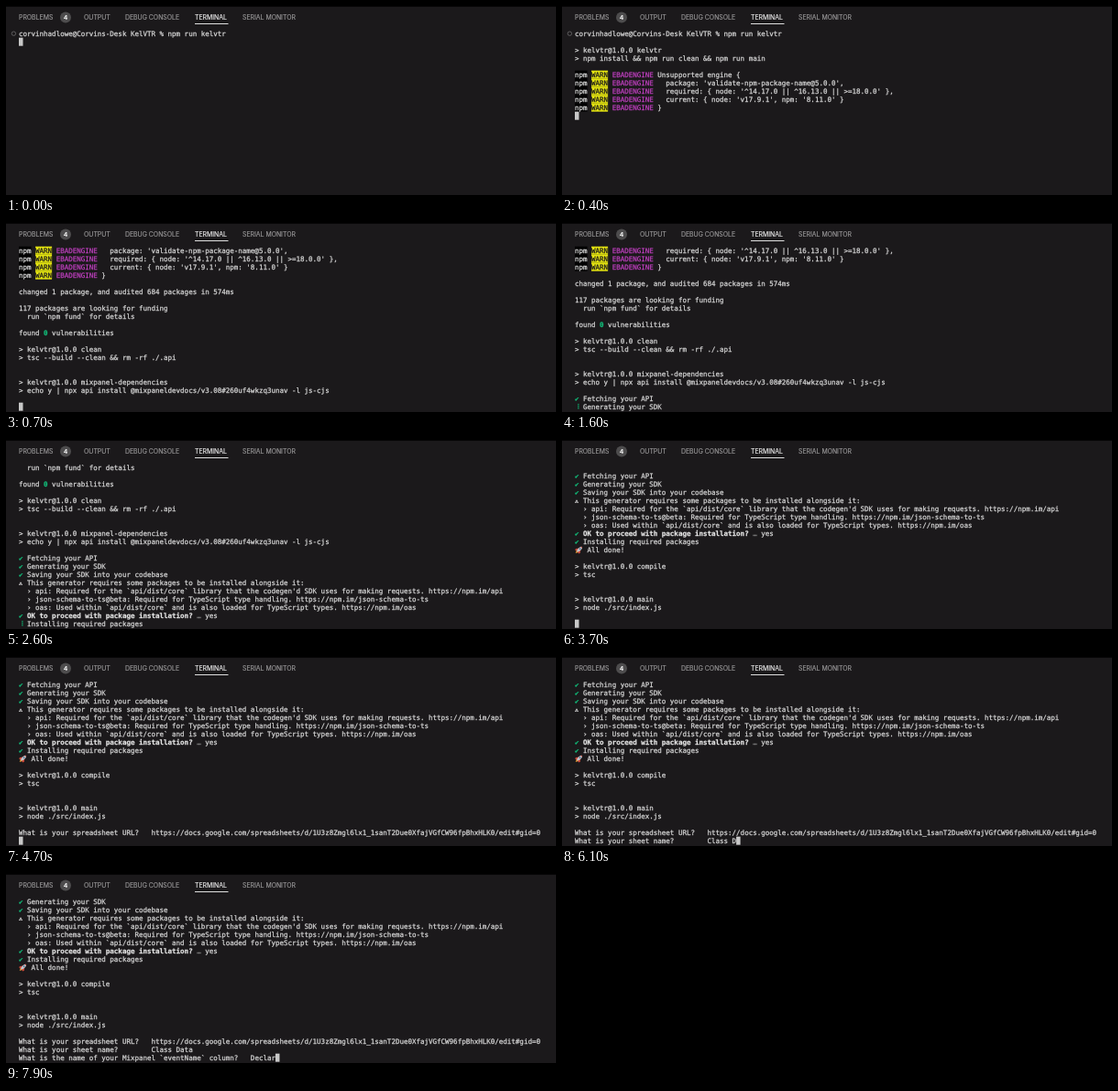
These frames come from a looping animation (600 by 207 pixels, 8000 ms). An HTML page with a canvas:

```html
<!DOCTYPE html>
<html lang="en">
<head>
<meta charset="utf-8">
<title>Terminal session</title>
<style>
  html, body { margin: 0; width: 100%; height: 100%; overflow: hidden; background: #1b191b; }
  canvas { display: block; width: 600px; height: 207px; }
</style>
</head>
<body>
<canvas id="stage"></canvas>
<script>
const W = 600, H = 207, LOOP = 8000;
const ROWS = 20, ROW_H = 9, TOP = 25.7, LEFT = 14, CELL = 4.515;
const MONO = '"DejaVu Sans Mono", monospace';
const SANS = 'Inter, sans-serif';
const BG = '#1b191b', TEXT = '#d6d6d6';

const canvas = document.getElementById('stage');
const ctx = canvas.getContext('2d');
const dpr = window.devicePixelRatio || 1;
canvas.width = W * dpr;
canvas.height = H * dpr;
ctx.scale(dpr, dpr);
ctx.lineJoin = 'round';

// Inline markup: «style|text»
const STYLES = {
  n: { color: '#e5e5e5', back: '#000' },
  w: { color: '#1b191b', back: '#e5e510' },
  m: { color: '#bc3fbc' },
  g: { color: '#12bc79' },
  G: { color: '#12bc79', bold: true },
  b: { color: '#e2e2e2', bold: true },
  d: { color: '#8a8a8a' },
  a: { color: '#e8e8e8', size: 6.6 },
  s: { color: '#12a86c', spinner: true },
  r: { rocket: true }
};
const SPINNER = '⠋⠙⠹⠸⠼⠴⠦⠧⠇⠏';
const STALLS = [[1600, 1900], [2100, 2500]];

const warn = text => `«n|npm» «w|WARN» «m|EBADENGINE» ${text}\n`;
const script = (name, command) => `\n> kelvtr@1.0.0 ${name}\n> ${command}\n\n`;
const busy = text => `\r«s|*» ${text}`;
const done = text => `\r«g|✔» ${text}\n`;

// Terminal output by time; "\r" rewrites the current line.
const output = [
  [0, 'corvinhadlowe@Corvins-Desk KelVTR % npm run kelvtr\n'],
  [100, script('kelvtr', 'npm install && npm run clean && npm run main')],
  [400, warn('Unsupported engine {') +
    warn("  package: 'validate-npm-package-name@5.0.0',") +
    warn("  required: { node: '^14.17.0 || ^16.13.0 || >=18.0.0' },") +
    warn("  current: { node: 'v17.9.1', npm: '8.11.0' }") +
    warn('}')],
  [500, '\nchanged 1 package, and audited 684 packages in 574ms\n' +
    '\n117 packages are looking for funding\n  run `npm fund` for details\n' +
    '\nfound «G|0» vulnerabilities\n'],
  [600, script('clean', 'tsc --build --clean && rm -rf ./.api')],
  [700, script('mixpanel-dependencies',
    'echo y | npx api install @mixpaneldevdocs/v3.08#260uf4wkzq3unav -l js-cjs')],
  [1000, busy('Fetching your API')],
  [1500, done('Fetching your API') + busy('Generating your SDK')],
  [2500, done('Generating your SDK') + done('Saving your SDK into your codebase') +
    '«a|⚠» This generator requires some packages to be installed alongside it:\n' +
    "  › api: Required for the `api/dist/core` library that the codegen'd SDK uses for making requests. https://npm.im/api\n" +
    '  › json-schema-to-ts@beta: Required for TypeScript type handling. https://npm.im/json-schema-to-ts\n' +
    '  › oas: Used within `api/dist/core` and is also loaded for TypeScript types. https://npm.im/oas\n' +
    done('«b|OK to proceed with package installation?» «d|…» yes') +
    busy('Installing required packages')],
  [3300, done('Installing required packages') + '«r|  » All done!\n'],
  [3400, script('compile', 'tsc')],
  [3700, script('main', 'node ./src/index.js')],
  [3900, 'What is your spreadsheet URL?   '],
  [4400, 'https://docs.google.com/spreadsheets/d/1U3z8Zmgl6lx1_1sanT2Due0XfajVGfCW96fpBhxHLK0/edit#gid=0'],
  [4700, '\n'],
  [4900, 'What is your sheet name?        '],
  ...['C', 'l', 'a', 's', 's', ' ', 'D', 'a', 'ta'].map((key, i) => [5500 + i * 100, key]),
  [6500, '\n'],
  [6900, 'What is the name of your Mixpanel `eventName` column?   '],
  [7100, 'D'], [7400, 'e'], [7700, 'c'], [7800, 'la'], [7900, 'r']
];

function linesAt(time) {
  const text = output.filter(([at]) => at <= time).map(([, part]) => part).join('');
  return text.split('\n').map(line => line.slice(line.lastIndexOf('\r') + 1));
}

function spinnerGlyph(time) {
  const stall = STALLS.find(([from, to]) => time >= from && time < to);
  const tick = Math.floor((stall ? stall[0] : time) / 100);
  return SPINNER[(tick + 7) % SPINNER.length];
}

// A hairline outline gives the text its slightly heavy smoothing.
function label(text, x, y, color, font, weight = 0.25) {
  ctx.font = font;
  ctx.fillStyle = ctx.strokeStyle = color;
  ctx.lineWidth = weight;
  ctx.fillText(text, x, y);
  ctx.strokeText(text, x, y);
}

function shape(color, points) {
  ctx.fillStyle = color;
  ctx.beginPath();
  points.forEach(([x, y]) => ctx.lineTo(x, y));
  ctx.fill();
}

function drawRocket(x, y) {
  ctx.save();
  ctx.translate(x, y);
  ctx.rotate(Math.PI / 4);
  shape('#c9473a', [[-1, -1.4], [-3.4, 1.6], [-3, 3.2], [3, 3.2], [3.4, 1.6], [1, -1.4]]);
  shape('#f0a032', [[-1.3, 2.6], [0, 5.4], [1.3, 2.6]]);
  ctx.fillStyle = '#c4c8ce';
  ctx.beginPath();
  ctx.ellipse(0, -0.8, 1.6, 3.7, 0, 0, 2 * Math.PI);
  ctx.fill();
  shape('#c9473a', [[-1, -3.5], [0, -4.9], [1, -3.5]]);
  ctx.fillStyle = '#456f92';
  ctx.beginPath();
  ctx.arc(0, -1.4, 0.9, 0, 2 * Math.PI);
  ctx.fill();
  ctx.restore();
}

// Draws one marked-up line and returns its length in cells.
function drawLine(line, top, time) {
  let col = 0;
  for (const [, key, styled, plain] of line.matchAll(/«(\w)\|(.*?)»|([^«]+)/g)) {
    const style = STYLES[key] || { color: TEXT };
    const text = styled ?? plain;
    const x = LEFT + col * CELL;
    if (style.back) {
      ctx.fillStyle = style.back;
      ctx.fillRect(x, top, text.length * CELL, ROW_H);
    }
    if (style.rocket) {
      drawRocket(x + 4.6, top + 4.5);
    } else {
      const font = `${style.bold ? 'bold ' : ''}${style.size || 7.5}px ${MONO}`;
      label(style.spinner ? spinnerGlyph(time) : text, x, top + 6.9, style.color, font);
    }
    col += text.length;
  }
  return col;
}

function drawTabs() {
  const tabs = [['PROBLEMS', 14], ['OUTPUT', 85], ['DEBUG CONSOLE', 130],
    ['TERMINAL', 206], ['SERIAL MONITOR', 258]];
  for (const [name, x] of tabs) {
    label(name, x, 14.8, name === 'TERMINAL' ? '#ececec' : '#989798', `6.9px ${SANS}`, 0.15);
  }
  ctx.fillStyle = '#e0e0e0';
  ctx.fillRect(206, 19, 36.5, 1);
  ctx.fillStyle = '#4d4c4d';
  ctx.beginPath();
  ctx.arc(65, 12.4, 6, 0, 2 * Math.PI);
  ctx.fill();
  label('4', 62.8, 14.9, '#f4f4f4', `600 6.8px ${SANS}`, 0.15);
}

function drawTerminal(time) {
  const lines = linesAt(time);
  const first = Math.max(0, lines.length - ROWS);
  let top = TOP, end = 0;
  lines.slice(first).forEach((line, row) => {
    top = TOP + row * ROW_H;
    end = drawLine(line, top, time);
  });
  if (!lines[lines.length - 1].includes('«s|')) {
    ctx.fillStyle = '#c8c8c8';
    ctx.fillRect(LEFT + end * CELL, top, CELL, ROW_H);
  }
  if (first === 0) {
    ctx.strokeStyle = '#6c6b6c';
    ctx.lineWidth = 0.8;
    ctx.beginPath();
    ctx.arc(8.4, 30.2, 2.2, 0, 2 * Math.PI);
    ctx.stroke();
  }
}

const start = performance.now();
function frame() {
  const time = (performance.now() - start) % LOOP;
  ctx.fillStyle = BG;
  ctx.fillRect(0, 0, W, H);
  ctx.fillStyle = '#080708';
  ctx.fillRect(0, 0, W, 1);
  drawTabs();
  drawTerminal(time);
  requestAnimationFrame(frame);
}
frame();
</script>
</body>
</html>
```
